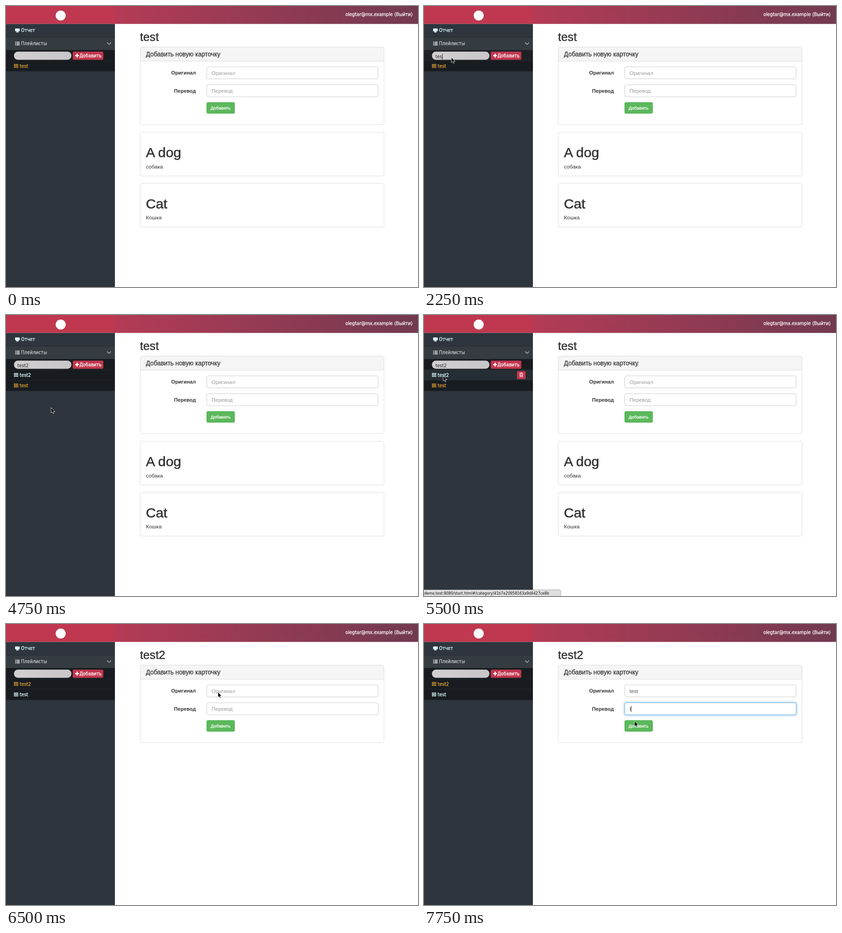
Animation of 904x619 px, one loop 8000 ms. Source, as an HTML page:

```html
<!DOCTYPE html>
<html lang="ru">
<head>
<meta charset="utf-8">
<title>Карточки</title>
<style>
  html, body { margin: 0; width: 100%; height: 100%; overflow: hidden; background: #fff; }
  svg { display: block; width: 904px; height: 619px; }
  text { white-space: pre; }
  .side { font-family: "DejaVu Sans", Verdana, sans-serif; font-size: 9.7px; }
  .main { font-family: "Liberation Sans", Arial, sans-serif; font-size: 11.7px; fill: #333; }
  .label { font-weight: bold; font-size: 11.2px; text-anchor: end; }
  .hint { font-size: 11.5px; fill: #999; }
  .typed { font-size: 11.5px; fill: #555; }
  .strong { stroke: currentColor; stroke-width: .3; }
  .white { fill: #fff; color: #fff; }
  .dark { fill: #333; color: #333; }
</style>
</head>
<body>
<svg viewBox="0 0 904 619" xmlns="http://www.w3.org/2000/svg">
  <defs>
    <linearGradient id="bar"><stop stop-color="#b43b55"/><stop offset="1" stop-color="#713a51"/></linearGradient>
    <linearGradient id="pill"><stop stop-color="#d2cfd1"/><stop offset="1" stop-color="#c8c6c8"/></linearGradient>
    <filter id="glow" x="-5%" y="-60%" width="110%" height="220%"><feGaussianBlur stdDeviation="2"/></filter>
  </defs>
  <g id="base"></g>
  <g id="live"></g>
</svg>
<script>
const LOOP = 8000, STEP = 250;
const base = document.getElementById('base');
const live = document.getElementById('live');

const rect = (x, y, w, h, fill, r = 0, more = '') =>
  `<rect x="${x}" y="${y}" width="${w}" height="${h}" rx="${r}" fill="${fill}" ${more}/>`;
const text = (x, y, s, cls, more = '') =>
  `<text x="${x}" y="${y}" class="${cls}" ${more}>${s}</text>`;
const frame = (x, y, w, h, color = '#ddd', fill = '#fff') =>
  rect(x, y, w, h, fill, 3.5, `stroke="${color}"`);
const line = (y, x1, x2, color) => rect(x1, y, x2 - x1, 1, color);

function gridIcon(x, y, color) {
  let s = '';
  for (let i = 0; i < 9; i++)
    s += rect(x + i % 3 * 3.3, y + Math.floor(i / 3) * 3.1, 2.6, 2.3, color, .4);
  return s;
}

function listIcon(x, y, color) {
  let s = '';
  for (let i = 0; i < 4; i++)
    s += rect(x, y + i * 2.3, 2, 1.6, color) + rect(x + 3, y + i * 2.3, 7, 1.6, color);
  return s;
}

const screenIcon = (x, y) =>
  rect(x, y, 10, 6.2, '#e1ffff', .6) +
  `<path d="M${x + 3.6} ${y + 6}h2.8l1.8 2.8h-6.4z" fill="#e1ffff"/>`;

const trashIcon = (x, y) =>
  `<g transform="translate(${x} ${y})" fill="none" stroke="#fff">
    <path d="M0 2H8M2.6 2V.5H5.4V2M1 2.5V9.3H7V2.5M3 4V8M5 4V8"/></g>`;

function drawBase() {
  base.innerHTML =
    rect(0, 0, 904, 619, '#fff') +
    rect(239, 0, 665, 39.5, 'url(#bar)') +
    rect(0, 0, 239, 39.5, '#c0384f') +
    '<circle cx="120" cy="21" r="11" fill="#fff"/>' +
    text(892, 21.7, 'olegtar@mx.example (Выйти)', 'side strong white', 'text-anchor="end"') +
    rect(0, 39.5, 239, 579.5, '#2e353d') +
    rect(0, 69, 239, 28, '#353c41') +
    line(68, 0, 239, '#23282e') +
    screenIcon(20, 49.5) +
    text(33, 57.3, 'Отчет', 'side strong', 'fill="#e1ffff" color="#e1ffff"') +
    listIcon(20, 78.5, '#c5c9cb') +
    text(33, 86.3, 'Плейлисты', 'side strong', 'fill="#c5c9cb" color="#c5c9cb"') +
    '<path d="M222 80.5l4.2 4.2 4.2-4.2" fill="none" stroke="#c5c9cb" stroke-width="1.3"/>' +
    frame(294.5, 90.5, 535, 171) +
    `<path d="M295 121V94q0-3 3-3H826q3 0 3 3V121z" fill="#f5f5f5"/>` +
    line(121, 295, 829, '#ddd') +
    text(307, 111, 'Добавить новую карточку', 'main strong dark', 'style="font-size:13.8px"') +
    text(416.5, 151, 'Оригинал', 'main label') +
    text(416.5, 191, 'Перевод', 'main label') +
    rect(440.5, 212.5, 61, 24, '#5cb85c', 2.5, 'stroke="#4cae4c"') +
    text(449, 228, 'Добавить', 'main strong white', 'style="font-size:9.9px;fill:#fff"');
}

function card(y, word, meaning) {
  return frame(294.5, y, 535, 96.5) +
    text(307, y + 55.3, word, 'main strong dark', 'style="font-size:30.2px;stroke-width:.6"') +
    text(307, y + 79.5, meaning, 'main');
}

function listRow(y, name, active, hover) {
  const color = active ? '#dfa036' : '#e1ffff';
  return rect(0, y, 239, 23.3, hover ? '#272e33' : '#181c20') +
    line(y + 22.6, 0, 239, '#23282e') +
    gridIcon(17.5, y + 7, color) +
    text(30, y + 15, name, 'side strong', `fill="${color}" color="${color}"`) +
    (hover ? rect(204, y + 2.7, 19, 17.8, '#c2374f', 2.5) + trashIcon(209.5, y + 6) : '');
}

// The caret is moved behind its text once the text can be measured.
const withCaret = (x, y, h, on) =>
  on ? `<rect class="caret" data-x="${x}" x="${x}" y="${y}" width="1" height="${h}" fill="#222"/>` : '';

function field(y, hint, value, focus) {
  const x = 440.5, w = 376, h = 26.5;
  const glow = focus
    ? rect(x, y, w, h, 'none', 3.5, 'stroke="#66afe9" stroke-width="4" opacity=".6" filter="url(#glow)"') : '';
  return glow + frame(x, y, w, h, focus ? '#66afe9' : '#ccc') +
    (value ? '' : text(451, y + 17.7, hint, 'main hint')) +
    text(451, y + 17.7, value, 'main typed') +
    withCaret(451, y + 7, 13, focus);
}

// time, x, y of the pointer tip
const path = [
  [250, 558, 10], [750, 200, 88], [1250, 60, 113], [3250, 60, 113],
  [4000, 181, 108], [4250, 181, 108], [4750, 99, 204], [5500, 42, 134],
  [6000, 42, 134], [6500, 465, 150], [7250, 465, 150], [7750, 462, 214]
];

function pointer(t) {
  if (t < path[0][0]) return '';
  let i = 0;
  while (i < path.length - 2 && t >= path[i + 1][0]) i++;
  const [t0, x0, y0] = path[i], [t1, x1, y1] = path[i + 1];
  const k = Math.min(1, (t - t0) / (t1 - t0));
  const x = x0 + (x1 - x0) * k, y = y0 + (y1 - y0) * k;
  return `<path transform="translate(${x} ${y})" d="M0 0V11.5L2.6 9.2L4.4 13.2L6.4 12.4L4.7 8.5H8.2Z"
    fill="#000" stroke="#fff" stroke-width=".8"/>`;
}

// Value of the last [time, value] entry already reached.
const pick = (t, list) => list.reduce((v, [at, next]) => t >= at ? next : v, '');

function draw(t) {
  const added = t >= 4500, opened = t >= 5750;
  const name = pick(t, [[1750, 't'], [2000, 'te'], [2250, 'tes'], [2500, 'test2'], [5750, '']]);
  const first = pick(t, [[7000, 'te'], [7250, 'test']]);
  const second = pick(t, [[7750, 't']]);
  const caret = t >= 1250 && t < 4500 && !(t >= 3000 && t < 3500);
  const hover = t >= 5250 && t < 5750;
  const status = t >= 5250 && t < 6250;

  live.innerHTML =
    rect(0, 97, 239, 24, t >= 1750 && t < 4500 ? '#1d2126' : '#181c20') +
    line(120, 0, 239, '#23282e') +
    rect(17.5, 100.5, 126, 18, 'url(#pill)', 8.5) +
    text(25, 115, name, 'side', 'fill="#222"') +
    withCaret(25, 105, 13, caret) +
    rect(146.5, 100.5, 67, 18, '#c2374f', 2.5) +
    '<path d="M156 105v8.4M151.8 109.2h8.4" stroke="#fff" stroke-width="2.4"/>' +
    text(161, 113, 'Добавить', 'side strong white') +
    (added ? listRow(120.7, 'test2', opened, hover) : '') +
    listRow(added ? 144 : 120.7, 'test', !opened, false) +
    text(294, 77.3, opened ? 'test2' : 'test', 'main strong dark', 'style="font-size:25.6px;stroke-width:.5"') +
    field(134, 'Оригинал', first, t >= 6750 && t < 7500) +
    field(173.5, 'Перевод', second, t >= 7500) +
    (opened ? '' : card(278, 'A dog', 'собака') + card(390.5, 'Cat', 'Кошка')) +
    (status
      ? '<path d="M-1 605.5H297q3 0 3 3V620H-1z" fill="#dfdfdf" stroke="#a5a5a5"/>' +
        text(.5, 615.5, 'demo.test:8080/start.html#/category/41b7e20958163a9d4427ce8b', 'side',
          'style="font-size:8px" fill="#111"')
      : '') +
    pointer(t);

  for (const c of live.querySelectorAll('.caret'))
    c.setAttribute('x', Math.round(+c.dataset.x + c.previousElementSibling.getComputedTextLength()));
}

let shown = -1;
function tick(now) {
  const t = Math.floor(now % LOOP / STEP) * STEP;
  if (t !== shown) draw(shown = t);
  requestAnimationFrame(tick);
}

drawBase();
draw(0);
requestAnimationFrame(tick);
</script>
</body>
</html>
```
